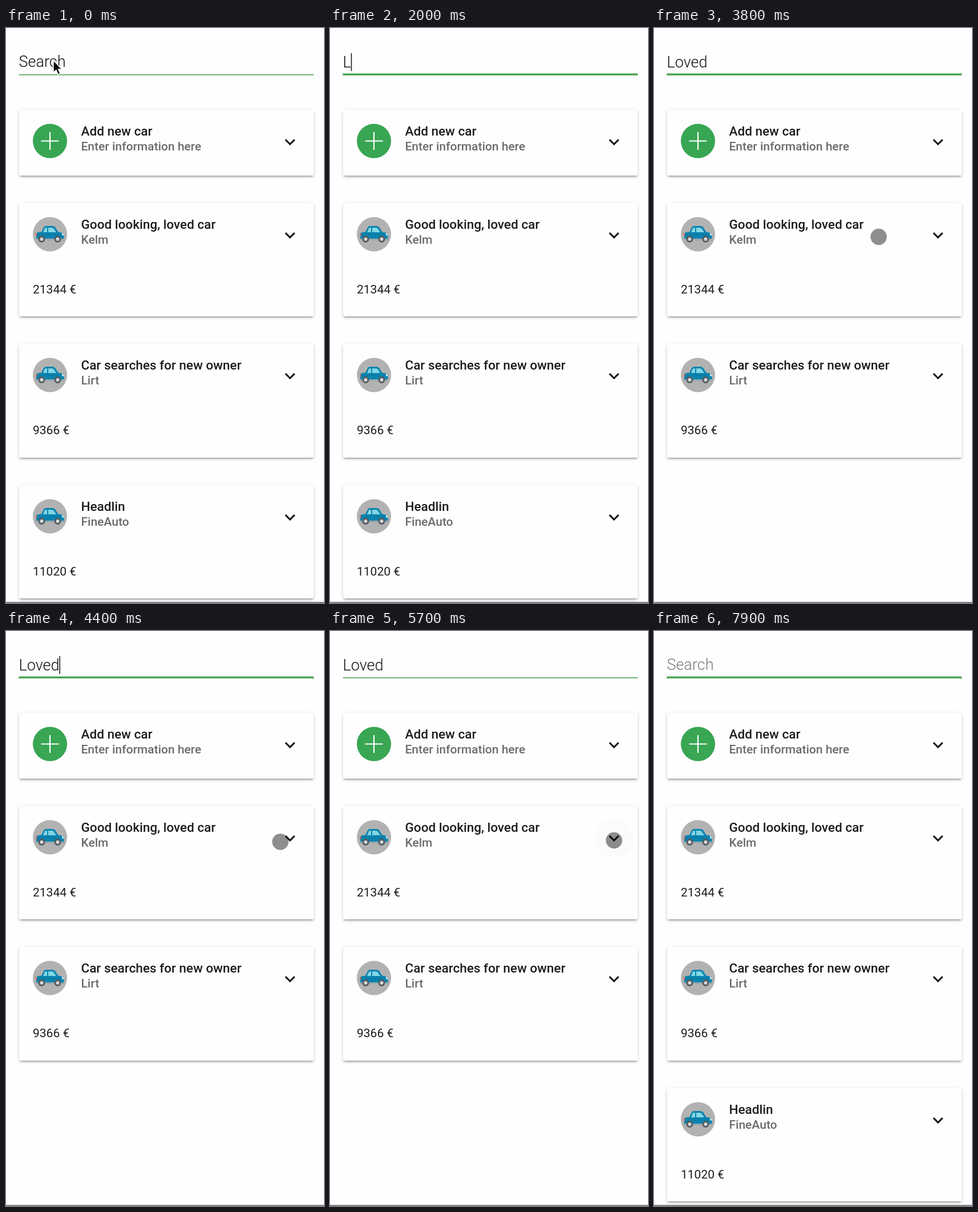
Recreate the animation shown at these times as an HTML page. Size 557x1005 px, loop 8 s.

```html
<!DOCTYPE html>
<html lang="en">
<head>
<meta charset="utf-8">
<title>Car list search</title>
<style>
html, body { margin: 0; width: 100%; height: 100%; overflow: hidden; background: #fefdff; }
body { position: relative; font-family: Roboto, "Open Sans", sans-serif; }
svg { position: absolute; left: 0; top: 0; overflow: visible; }
.card {
  position: absolute; left: 22.5px; width: 516.5px; border-radius: 3px; background: #fefdff;
  box-shadow: 0 4.5px 1.5px -3px rgba(0,0,0,.2), 0 3px 3px rgba(0,0,0,.14), 0 1.5px 7.5px rgba(0,0,0,.12);
}
.title { font-size: 22.5px; font-weight: 500; fill: #1c1c1e; }
.sub { font-size: 21px; font-weight: 500; fill: #6b6b6b; }
.body { font-size: 21px; fill: #1c1c1e; }
.field { font-size: 27px; font-weight: 300; fill: #111; }
</style>
</head>
<body>
<svg width="557" height="1005">
  <defs>
    <g id="car">
      <path d="M-24 9V0q0-3 4-3.500L-15-4-11-12Q-10-14.500-7-14.500H4Q7-14.500 9-12.500L14.500-4Q23-3 24.500 0V9Z" fill="#0a83ae"/>
      <path d="M-12-3.500-9-10.500Q-8.500-11.500-7-11.500H-5V-3.500ZM-3-11.500H3.500Q5.500-11.500 6.500-10L11-3.500H-3Z" fill="#83d6e4"/>
      <path d="M-24 1H24" stroke="#07769e" stroke-width="1"/>
      <path d="M-25 7.500H25V10.500H-24.500Z" fill="#9aa7ad"/>
      <path d="M21-2Q24.500-1.500 24.500 2H21Z" fill="#d5edf2"/>
      <path d="M-25-1h2.500v4H-25Z" fill="#d36a5c"/>
      <g fill="#d3d8da" stroke="#555b5f" stroke-width="3">
        <circle cx="-14.500" cy="8.500" r="4.500"/><circle cx="13.500" cy="8.500" r="4.500"/>
      </g>
    </g>
    <path id="down" d="M16.590 8.590 12 13.170 7.410 8.590 6 10l6 6 6-6z"/>
    <path id="up" d="M12 8l-6 6 1.410 1.410L12 10.830l4.590 4.580L18 14z"/>
  </defs>
  <text id="label" class="field" x="22.500" y="67.500">Search</text>
  <text id="typed" class="field" x="22.500" y="69"></text>
  <rect id="caret" y="44" width="1.500" height="31" fill="#111"/>
  <rect x="22.500" y="81" width="516.500" height="1.500" fill="#43a047"/>
  <rect id="focusLine" y="79.500" height="3" fill="#43a047"/>
</svg>
<div id="list"></div>
<svg width="557" height="1005">
  <rect y="1003" width="557" height="2" fill="#828284"/>
  <circle id="touch" r="14.300" fill="#000" fill-opacity=".44"/>
  <path id="arrow" d="M0 0V21.500L4.800 17 8.300 25 12 23.300 8.600 15.500H15Z" fill="#000" stroke="#fff" stroke-width="1.500"/>
</svg>
<script>
const LOOP = 8000, STEP = 100;
const LEFT = 22.5, WIDTH = 516.5, TOP = 142.5, GAP = 48, EXTRA = 96.5;
const $ = id => document.getElementById(id);

const entries = [
  { title: 'Add new car', sub: 'Enter information here' },
  { title: 'Good looking, loved car', sub: 'Kelm', price: '21344 €',
    note: ['I always loved my car and treated it like my own', 'child.'] },
  { title: 'Car searches for new owner', sub: 'Lirt', price: '9366 €' },
  { title: 'Headlin', sub: 'FineAuto', price: '11020 €' }
];

const text = (cls, x, y, s) => `<text class="${cls}" x="${x}" y="${y}">${s}</text>`;

function makeCard(e) {
  const el = document.createElement('div');
  el.className = 'card';
  const avatar = e.price
    ? '<circle r="30" fill="#b2b2b2"/><use href="#car"/>'
    : '<circle r="30" fill="#38a653"/><path d="M-15.5 0h31M0-15.500v31" stroke="#fff" stroke-width="2.200"/>';
  const note = (e.note || []).map((s, i) => text('body', 24, 230 + 24 * i, s)).join('');
  el.innerHTML = `<svg width="516" height="115">
    <g transform="translate(54 54.500)">${avatar}</g>
    ${text('title', 108.5, 45, e.title)}${text('sub', 108.5, 71, e.sub)}
    ${e.price ? text('body', 24, 158, e.price) : ''}
    <g class="note">${note}</g>
    <circle class="ripple" cx="474.500" cy="56.500" r="34" opacity="0"/>
    <use class="icon" href="#down" fill="#161616" transform="translate(456.500 38.200) scale(1.500)"/>
  </svg>`;
  $('list').append(el);
  return { el, note: el.querySelector('.note'), icon: el.querySelector('.icon'),
    ripple: el.querySelector('.ripple'), base: e.price ? 198.5 : 115 };
}
const cards = entries.map(makeCard);

// [time, value] tables
const typing = [[0, ''], [2000, 'L'], [2200, 'Lo'], [2500, 'Lov'], [2700, 'Love'], [3100, 'Loved'],
  [7400, 'Love'], [7500, 'Lov'], [7600, 'Lo'], [7700, 'L'], [7800, '']];
const caretOn = [[500, 1000], [1500, 3600], [4100, 4600], [6600, 7100], [7400, 7900]];
const arrowPath = [[0, 83, 56.5], [500, 58, 53.5]];
const touchPath = [[3400, 150, 150], [3600, 290, 290], [3800, 393.5, 365], [4300, 480, 368.5],
  [4800, 485.5, 368], [5300, 497.5, 366], [5900, 497.5, 366], [6500, 120, 72]];

const within = (t, a, b) => t >= a && t < b;
const clamp = x => Math.min(1, Math.max(0, x));
const smooth = x => x * x * (3 - 2 * x);
const show = (el, on) => { el.style.display = on ? '' : 'none'; };

function latest(table, t) {
  let v = table[0][1];
  for (const [at, value] of table) if (t >= at) v = value;
  return v;
}

function along(path, t) {
  let i = 0;
  while (i < path.length - 2 && t >= path[i + 1][0]) i++;
  const [t0, x0, y0] = path[i], [t1, x1, y1] = path[i + 1];
  const k = smooth(clamp((t - t0) / (t1 - t0)));
  return [x0 + (x1 - x0) * k, y0 + (y1 - y0) * k];
}

function place(el, path, t, on) {
  show(el, on);
  el.setAttribute('transform', `translate(${along(path, t)})`);
}

// fast start, soft landing over 200 ms
const swift = (t, at) => 1 - Math.pow(1 - clamp((t - at) / 200), 1.88);

function draw(t) {
  const word = latest(typing, t);
  $('typed').textContent = word;
  show($('label'), !word);
  $('label').setAttribute('opacity', t < 7800 ? 1 : 0.55 + (t - 7900) / 300);

  show($('caret'), caretOn.some(([a, b]) => within(t, a, b)));
  $('caret').setAttribute('x', LEFT + (word ? $('typed').getComputedTextLength() : 0));

  const focus = swift(t, 500) - swift(t, 4700) + swift(t, 6600);
  $('focusLine').setAttribute('x', LEFT + WIDTH * (1 - focus) / 2);
  $('focusLine').setAttribute('width', WIDTH * focus);

  const open = within(t, 4700, 5600);
  let y = TOP;
  cards.forEach((c, i) => {
    const wide = open && i === 1;
    const h = c.base + (wide ? EXTRA : 0);
    c.el.style.top = y + 'px';
    c.el.style.height = h + 'px';
    show(c.note, wide);
    c.icon.setAttribute('href', wide ? '#up' : '#down');
    y += h + GAP;
  });
  show(cards[3].el, word.length < 2);
  cards[1].ripple.setAttribute('opacity', within(t, 5600, 5800) ? (5800 - t) / 10000 : 0);

  place($('arrow'), arrowPath, t, t < 2000);
  place($('touch'), touchPath, t, within(t, 3400, 7300));
}

const start = performance.now();
function tick() {
  const t = (performance.now() - start) % LOOP;
  draw(Math.floor(t / STEP) * STEP);
  requestAnimationFrame(tick);
}
tick();
</script>
</body>
</html>
```
